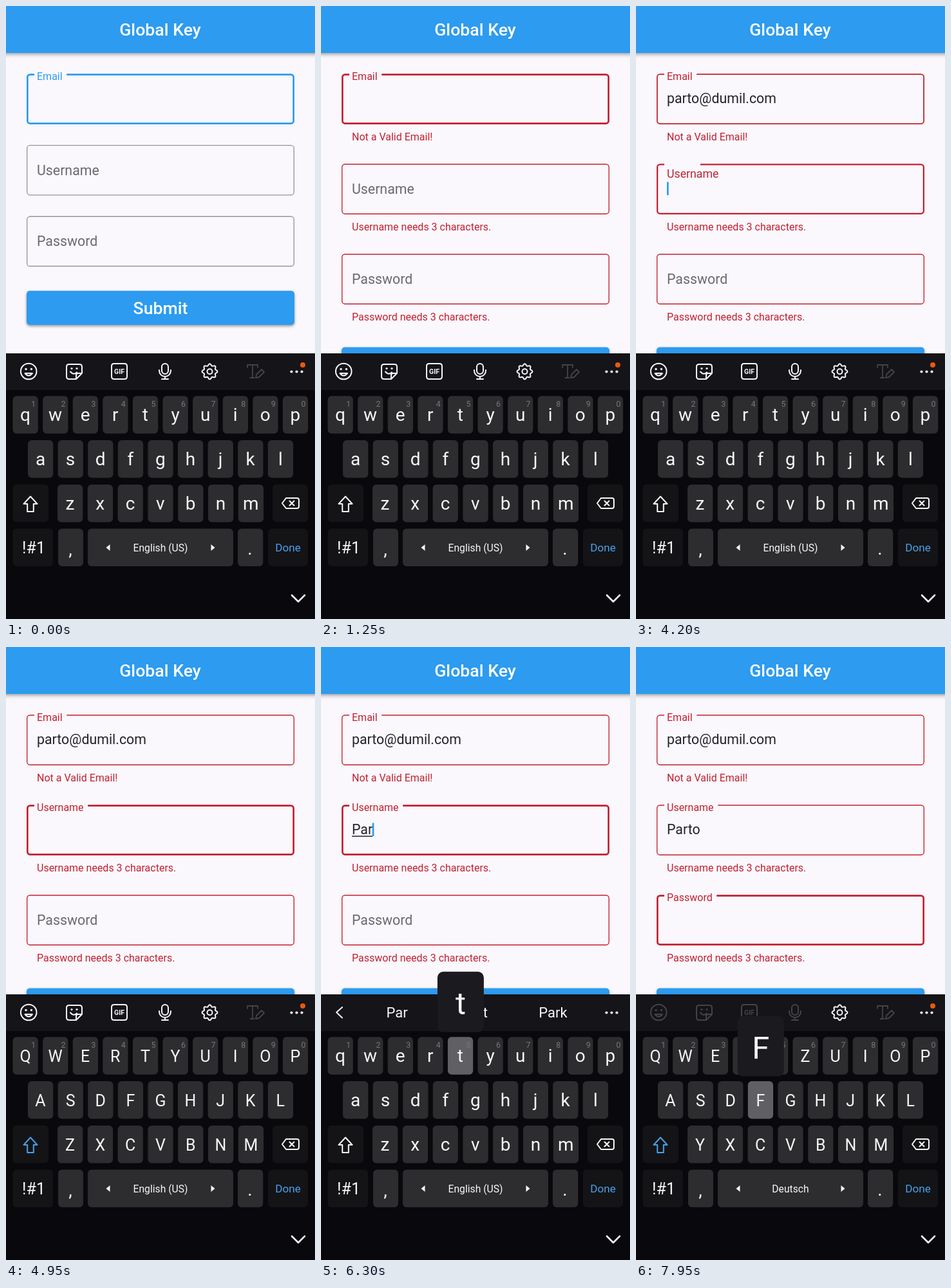
Recreate the animation shown at these times as an HTML page with a canvas. Size 480x953 px, loop 8 s.

```html
<!DOCTYPE html>
<html lang="en">
<head>
<meta charset="utf-8">
<title>Global Key</title>
<style>
html, body { margin: 0; width: 100%; height: 100%; overflow: hidden; background: #09080c; }
canvas { display: block; }
</style>
</head>
<body>
<canvas width="480" height="953"></canvas>
<script>
const c = document.querySelector('canvas').getContext('2d');
const LOOP = 8000, FADE = 167;
const BLUE = [44, 155, 240], RED = [194, 32, 48], GREY = [108, 104, 110], LINE = [150, 148, 152];
const PAGE = '#faf8fd', KEY = '#2d2d30', DARK = '#141417', HIT = '#606064', DIM = '#444447', WHITE = '#f7f7f9';

const SUBMIT_DOWN = 600, VALIDATE = 880, PASTE_OPEN = 2640, PASTE = 3200;
const FOCUS_USER = 4129, FOCUS_PASS = 7100;
const SHIFT_ON = 4680, SHIFT_OFF = 5450, SECURE = 7300, GERMAN = 7450;
const MAIL = 'parto@dumil.com', NAME = 'Parto';

// key, pressed at, released at
const presses = [['p', 5250, 5460], ['a', 5700, 5830], ['r', 5950, 6080],
  ['t', 6200, 6330], ['o', 6450, 6580], ['f', 7700, LOOP]];
const hints = [['P', 'Please', 'People'], ['Pa', 'Paper', 'Page'], ['Par', 'Part', 'Park'],
  ['Part', 'Party', 'Parts'], [NAME, NAME + '.nemir', NAME + '.nemirh']];
const caretOn = [[650, 1200], [1775, 2375], [2600, 3775], [FOCUS_USER, 4700],
  [5200, 7000], [FOCUS_PASS, 7650]];

const clamp = x => Math.min(1, Math.max(0, x));
const lerp = (a, b, p) => a + (b - a) * p;
const mix = (a, b, p) => a.map((v, i) => lerp(v, b[i], p));
const rgb = v => `rgb(${v.map(Math.round)})`;
const within = (t, a, b) => t >= a && t < b;

// cubic-bezier(.4, 0, .2, 1)
function ease(x) {
  if (x <= 0 || x >= 1) return clamp(x);
  let a = 0, b = 1, s = .5;
  for (let i = 0; i < 16; i++) {
    s = (a + b) / 2;
    const q = 1 - s;
    if (1.2 * q * q * s + .6 * q * s * s + s ** 3 < x) a = s; else b = s;
  }
  return 3 * (1 - s) * s * s + s ** 3;
}
const since = (t, start) => ease((t - start) / FADE);

function text(s, x, y, size, color, align = 'left', weight = 400) {
  c.font = `${weight} ${size}px Roboto, sans-serif`;
  c.textAlign = align;
  c.fillStyle = color;
  c.fillText(s, x, y);
}
function box(x, y, w, h, r, color) {
  c.beginPath();
  c.roundRect(x, y, w, h, r);
  c.fillStyle = color;
  c.fill();
}
function shadow(color, blur, y) {
  c.shadowColor = color;
  c.shadowBlur = blur;
  c.shadowOffsetY = y;
}
function stroke(d, color, width = 2) {
  c.strokeStyle = color;
  c.lineWidth = width;
  c.lineJoin = c.lineCap = 'round';
  c.stroke(new Path2D(d));
}
function dot(x, y, r, color) {
  c.beginPath();
  c.arc(x, y, r, 0, 7);
  c.fillStyle = color;
  c.fill();
}

function field({ top, label, focus, float, value, error, help, composing, caret }) {
  const idle = mix(LINE, BLUE, focus), width = lerp(1.33, 2.67, focus), h = width / 2;
  c.beginPath();
  c.roundRect(32 + h, top + .3 + h, 416 - width, 78.6 - width, 5.3 - h);
  c.strokeStyle = rgb(mix(idle, RED, error));
  c.lineWidth = width;
  c.stroke();

  c.font = '16px Roboto, sans-serif';
  const gap = (c.measureText(label).width + 10.6) * float;
  c.fillStyle = PAGE;
  if (gap) c.fillRect(44, top - 1, gap, 6);
  const active = mix(mix(GREY, BLUE, focus), RED, error);
  text(label, 48, top + lerp(47, 10, float), lerp(21.33, 16, float),
    rgb(mix(GREY, active, clamp(float * 1.4))));

  text(value, 48, top + 46, 21.33, '#242328');
  const end = 48 + c.measureText(value).width;
  if (composing) c.fillRect(48, top + 48.5, end - 48, 1.5);
  if (caret) {
    c.fillStyle = rgb(BLUE);
    c.fillRect(end - (value ? .5 : 0), top + 28.5, 2.7, 20.5);
  }
  c.globalAlpha = error;
  text(help, 48, top + 104 - 5 * (1 - error), 16, rgb(RED));
  c.globalAlpha = 1;
}

function button(t, top) {
  const down = clamp((t - SUBMIT_DOWN) / 150) * (1 - clamp((t - VALIDATE) / 200));
  c.save();
  shadow('rgba(0,0,0,.4)', 4 + 5 * down, 2 + 2 * down);
  box(32, top, 416, 53, 5, rgb(BLUE));
  c.restore();
  const fade = 1 - clamp((t - VALIDATE) / 375);
  if (t > SUBMIT_DOWN && fade) {
    c.save();
    c.beginPath();
    c.roundRect(32, top, 416, 53, 5);
    c.clip();
    dot(240, top + 26.5, lerp(30, 215, ease((t - SUBMIT_DOWN) / 450)), `rgba(255,255,255,${.22 * fade})`);
    c.restore();
  }
  text('Submit', 240, top + 36, 26.67, '#fff', 'center', 500);
}

function form(t) {
  const error = since(t, VALIDATE), moved = t >= VALIDATE;
  const toUser = since(t, FOCUS_USER), toPass = since(t, FOCUS_PASS);
  const typed = presses.filter(p => p[0] !== 'f' && t >= p[2]).length;
  const caret = caretOn.some(([a, b]) => within(t, a, b));
  const inUser = within(t, FOCUS_USER, FOCUS_PASS);

  field({ top: 105, label: 'Email', focus: 1 - toUser, float: 1, error, help: 'Not a Valid Email!',
    value: t >= PASTE ? MAIL : '', caret: caret && t < FOCUS_USER });
  field({ top: moved ? 245 : 215.7, label: 'Username', focus: toUser * (1 - toPass), float: toUser, error,
    help: 'Username needs 3 characters.', value: NAME.slice(0, typed),
    composing: typed && inUser, caret: caret && inUser });
  field({ top: moved ? 385 : 326.3, label: 'Password', focus: toPass, float: toPass, error,
    help: 'Password needs 3 characters.', value: '', caret: caret && t >= FOCUS_PASS });
  button(t, moved ? 530.5 : 442.8);
}

function header() {
  c.save();
  shadow('rgba(0,0,0,.4)', 6, 2);
  c.fillStyle = rgb(BLUE);
  c.fillRect(-9, -9, 498, 82);
  c.restore();
  text('Global Key', 239.5, 46, 26.67, '#fff', 'center', 500);
}

function pasteMenu(t) {
  const alpha = clamp((t - PASTE_OPEN) / 175) * (1 - clamp((t - PASTE) / 150));
  if (!alpha) return;
  c.save();
  c.globalAlpha = alpha * .93 + .07 * alpha * clamp((t - 2800) / 50);
  shadow('rgba(0,0,0,.35)', 3, 1);
  box(11, 61.5, 86, 58.5, 9, '#fcfbfe');
  shadow('transparent', 0, 0);
  text('Paste', 54, 97, 18.67, '#343338', 'center', 500);
  c.restore();
}

function tools(secure) {
  const color = secure ? DIM : WHITE;
  stroke('M47.5 568a12.3 12.3 0 1 1-24.6 0a12.3 12.3 0 1 1 24.6 0M29.5 571q5.7 7 11.4 0z', color);
  dot(31, 564.5, 1.7, color);
  dot(39.4, 564.5, 1.7, color);
  stroke('M98 557h16q4 0 4 4v10l-9 9h-11q-4 0-4-4v-15q0-4 4-4M118 571h-6q-3 0-3 3v6M100 568.5q5 6 10 1', color);
  dot(102, 563.5, 1.6, color);
  dot(110, 563.5, 1.6, color);
  stroke('M168 556h16q4 0 4 4v16q0 4-4 4h-16q-4 0-4-4v-16q0-4 4-4', color);
  text('GIF', 176, 571.8, 10.5, color, 'center', 700);
  stroke('M242 561a5 5 0 0 1 10 0v6a5 5 0 0 1-10 0zM238 566v1a9 9 0 0 0 18 0v-1M247 576v4M242 580h10', color);

  let gear = '';
  for (let i = 0; i < 80; i++) {
    const a = i * Math.PI / 40, r = 10.6 + 1.4 * Math.cos(8 * a);
    gear += (i ? 'L' : 'M') + (316.5 + r * Math.sin(a)) + ' ' + (568.3 - r * Math.cos(a));
  }
  stroke(gear + 'zM320.5 568.3a4 4 0 1 1-8 0a4 4 0 1 1 8 0', WHITE);
  stroke('M375 562v-4h16v4M383 558v20M379.5 578h6M388 578l1-5 8-8 4 4-8 8z', DIM, 1.8);
}

function suggestions(row, age) {
  const p = clamp(age / 180);
  stroke('M33 560l-9 8 9 8.5', WHITE);
  row.forEach((word, i) => {
    const x = [118, 238.5, 360.5][i], size = word.length > 11 ? 19.6 : 22;
    let fill = WHITE;
    if (i && p < 1) {
      fill = c.createLinearGradient(x - 33, 0, x + 33, 0);
      fill.addColorStop(p, WHITE);
      fill.addColorStop(1, `rgba(247,247,249,${p * .8})`);
    }
    text(word, x, 576, size, fill, 'center');
  });
}

function toolbar(t) {
  c.fillStyle = '#151418';
  c.fillRect(0, 540, 480, 57);
  const done = presses.filter(p => p[0] !== 'f' && t >= p[2]);
  const suggesting = done.length && t < SECURE;
  if (suggesting) suggestions(hints[done.length - 1], t - done[done.length - 1][2] - 10);
  else tools(t >= SECURE);
  for (const x of [443.5, 451.5, 459.5]) dot(x, 568.5, 2.1, WHITE);
  if (!suggesting) dot(461, 558, 4, '#e8590f');
}

function keyboard(t) {
  c.fillStyle = '#09080c';
  c.fillRect(0, 540, 480, 413);
  toolbar(t);
  const german = t >= GERMAN, upper = german || within(t, SHIFT_ON, SHIFT_OFF);
  const hit = presses.find(p => within(t, p[1], p[2]));
  const rows = [german ? 'qwertzuiop' : 'qwertyuiop', 'asdfghjkl', german ? 'yxcvbnm' : 'zxcvbnm'];
  const show = k => upper ? k.toUpperCase() : k;
  let popup;

  rows.forEach((row, r) => [...row].forEach((k, i) => {
    const x = [10.5, 34, 80][r] + i * [46.6, 46.6, 46.8][r], y = 606.3 + 68.8 * r;
    const on = hit && hit[0] === k;
    box(x, y, 39.3, 58.5, 6, on ? HIT : KEY);
    text(show(k), x + 19.5, y + 39, upper ? 25 : 28, WHITE, 'center');
    if (!r) text((i + 1) % 10, x + 32, y + 16.5, 12.5, '#77777a', 'center');
    if (on) popup = [x, y, k];
  }));

  const y3 = 743.8, y4 = 812.5;
  box(10.5, y3, 55.5, 58.5, 6, DARK);
  stroke('M38 762.5l10.5 11.5h-5.7v12h-9.6v-12h-5.7z', upper ? '#48a0ea' : WHITE);
  box(414, y3, 55, 58.5, 6, DARK);
  stroke('M429 773l6-8h17q3 0 3 3v10q0 3-3 3h-17zM440.5 769.5l7 7M447.5 769.5l-7 7', WHITE);

  box(10.5, y4, 62.5, 58.5, 6, DARK);
  text('!#1', 43, 851, 25, WHITE, 'center');
  box(81, y4, 39, 58.5, 6, KEY);
  text(',', 100, 854, 28, WHITE, 'center');
  box(127, y4, 226, 58.5, 6, KEY);
  text(german ? 'Deutsch' : 'English (US)', 240, 848, 15.7, WHITE, 'center');
  c.fill(new Path2D('M155.5 842l6-5v10zM324.5 842l-6-5v10z'));
  box(360, y4, 39.3, 58.5, 6, KEY);
  text('.', 379, 853, 28, WHITE, 'center');
  box(407, y4, 62, 58.5, 6, DARK);
  text('Done', 438, 848, 17.2, '#48a0ea', 'center');
  stroke('M444 916l10 10 10-10', WHITE, 2.6);

  if (popup) {
    const [x, y, k] = popup, left = Math.min(398, Math.max(10, x - 16));
    box(left, y - 101.5, 72, 94, 9, '#1b1a1e');
    text(show(k), left + 36, y - 35, 49, WHITE, 'center');
  }
}

function draw(now) {
  const t = now % LOOP;
  c.fillStyle = PAGE;
  c.fillRect(0, 0, 480, 953);
  header();
  form(t);
  pasteMenu(t);
  keyboard(t);
  requestAnimationFrame(() => draw(performance.now() - start));
}
const start = performance.now();
draw(0);
</script>
</body>
</html>
```
